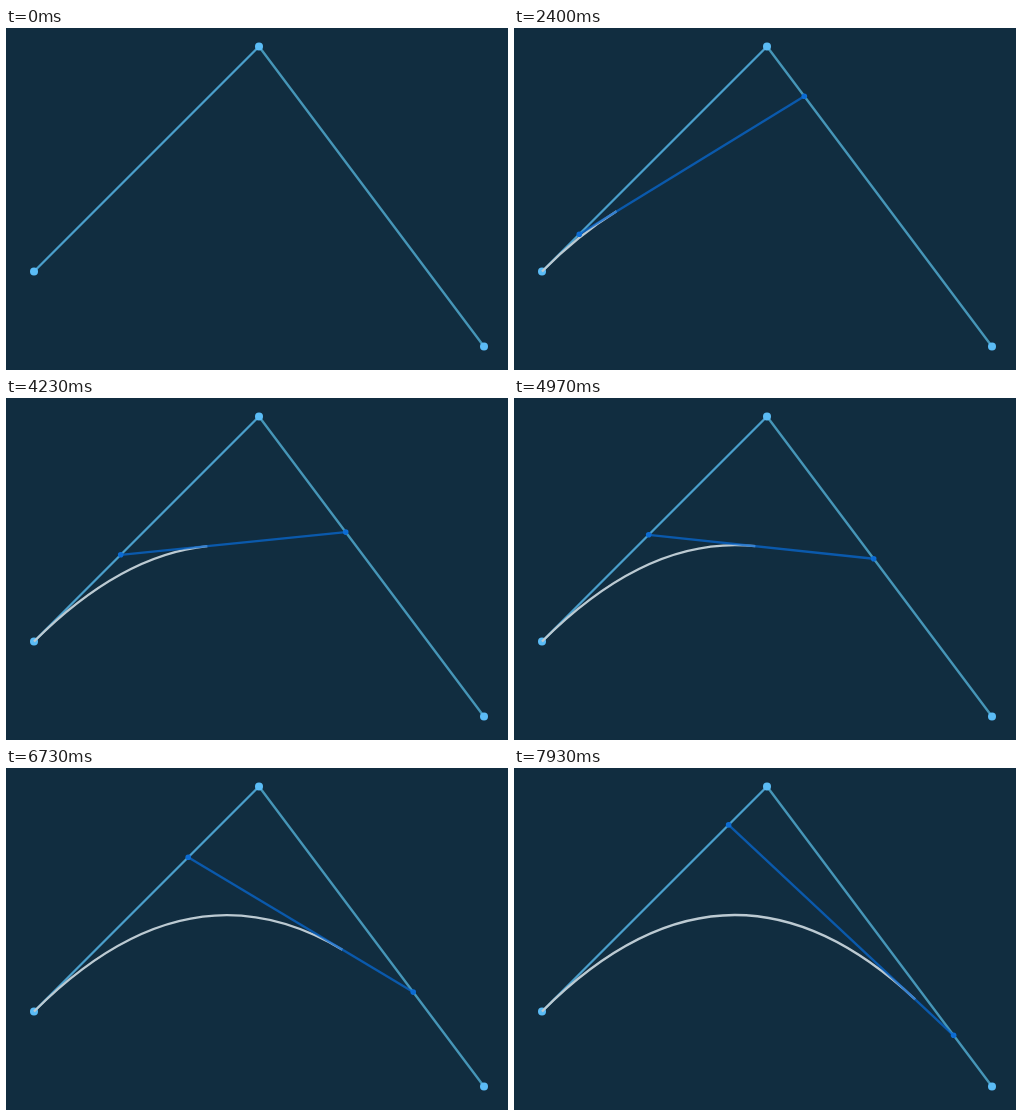
These frames come from a looping animation (502x342 px, 8 s). An HTML page with a canvas:

```html
<!DOCTYPE html>
<html lang="en">
<head>
<meta charset="utf-8">
<title>Quadratic Bézier construction</title>
<style>
html, body { margin: 0; width: 100%; height: 100%; overflow: hidden; background: #112d40; }
canvas { display: block; }
</style>
</head>
<body>
<canvas id="stage" width="502" height="342"></canvas>
<script>
const ctx = document.getElementById('stage').getContext('2d');
const LOOP = 8000, START = 1020, SPEED = 0.00012;
const A = [28, 243.5], B = [253, 18.5], C = [478, 318.5];

const mix = (p, q, t) => p.map((v, i) => v + (q[i] - v) * t);

function line(p, q, color) {
  ctx.strokeStyle = color;
  ctx.beginPath();
  ctx.moveTo(...p);
  ctx.lineTo(...q);
  ctx.stroke();
}

function dot(p, radius, color) {
  ctx.fillStyle = color;
  ctx.beginPath();
  ctx.arc(...p, radius, 0, 2 * Math.PI);
  ctx.fill();
}

function draw(t) {
  ctx.fillStyle = '#112d40';
  ctx.fillRect(0, 0, 502, 342);
  ctx.lineWidth = 2.3;
  line(A, B, '#4a9fcc');
  line(B, C, '#4696b8');
  [A, B, C].forEach(p => dot(p, 4, '#5bbcf6'));
  if (t <= 0) return;

  const left = mix(A, B, t), right = mix(B, C, t);
  // The part of the curve drawn so far is itself a quadratic with control point `left`
  ctx.strokeStyle = '#bccad2';
  ctx.beginPath();
  ctx.moveTo(...A);
  ctx.quadraticCurveTo(...left, ...mix(left, right, t));
  ctx.stroke();

  line(left, right, 'rgba(8, 104, 208, .75)');
  dot(left, 2.8, '#0c6cd4');
  dot(right, 2.8, '#0c6cd4');
}

function frame() {
  draw((performance.now() % LOOP - START) * SPEED);
  requestAnimationFrame(frame);
}
frame();
</script>
</body>
</html>
```
